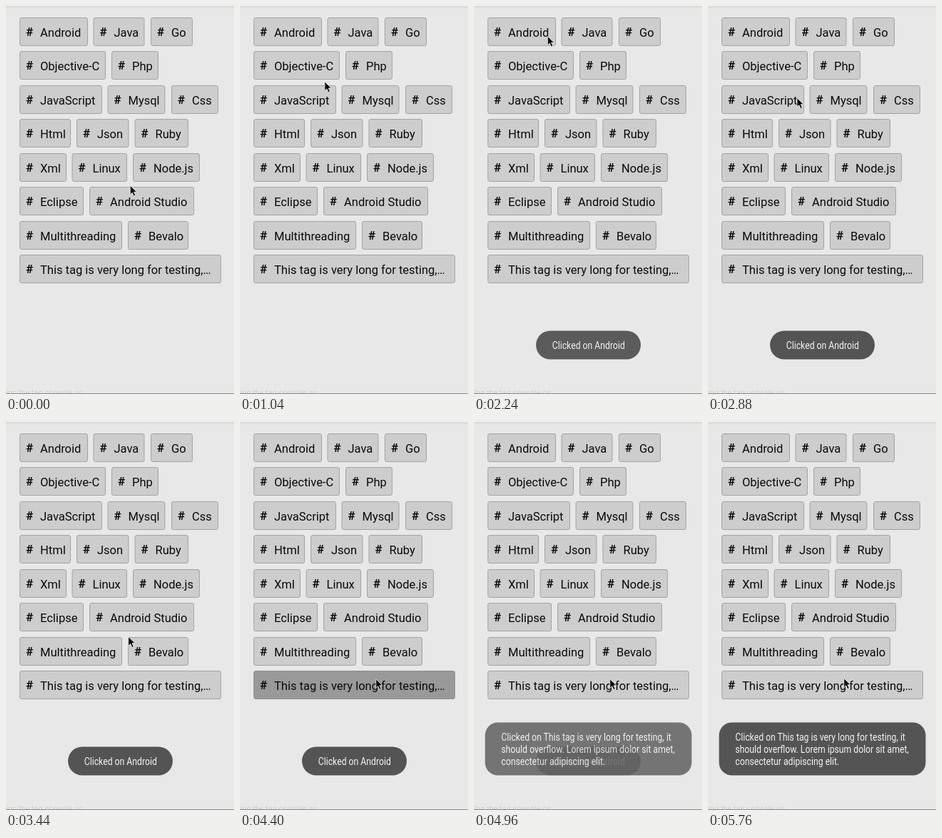
An HTML page that plays this animation: 320x543 px, repeating every 6.48 s.

```html
<!DOCTYPE html>
<html lang="en">
<head>
<meta charset="utf-8">
<title>Tag list</title>
<style>
  html, body { margin: 0; width: 100%; height: 100%; overflow: hidden; background: #e8e8e8; }
  svg { display: block; width: 100%; height: 100%; }
  text { font-family: Roboto, "Open Sans", sans-serif; white-space: pre; }
  .chip rect { fill: #cdcdcd; stroke: #a3a3a3; }
  .chip.down rect { fill: #999; stroke: #8e8e8e; }
  .chip text { font-size: 16.5px; fill: #0a0a0a; }
  .chip .hash { font-size: 17px; font-weight: 700; }
  .toast rect { fill: #545454; }
  .toast text { font-size: 13.9px; fill: #f4f4f4; }
  .caption { font-size: 11px; fill: #cfcfcf; }
</style>
</head>
<body>
<svg id="stage" viewBox="0 0 320 543">
  <defs>
    <linearGradient id="shade" x2="0" y2="1">
      <stop offset="0" stop-color="#d6d6d6"/>
      <stop offset="1" stop-color="#e8e8e8"/>
    </linearGradient>
  </defs>
  <rect width="320" height="543" fill="#e8e8e8"/>
  <rect width="320" height="4" fill="url(#shade)"/>
  <text class="caption" x="0" y="545">ing the tag console on</text>
  <rect y="542" width="320" height="1" fill="#8a8a8a"/>
</svg>
<script>
const LOOP = 6480, STEP = 80;
const stage = document.getElementById('stage');

function add(parent, tag, attrs, text) {
  const node = document.createElementNS('http://www.w3.org/2000/svg', tag);
  for (const key in attrs) node.setAttribute(key, attrs[key]);
  if (text) node.textContent = text;
  return parent.appendChild(node);
}

// Each row: label, left, right
const rows = [
  [['Android', 19, 115], ['Java', 122.5, 194.5], ['Go', 203, 262]],
  [['Objective-C', 19, 140], ['Php', 148, 214]],
  [['JavaScript', 19, 135], ['Mysql', 142.5, 223.5], ['Css', 232, 298]],
  [['Html', 19, 91], ['Json', 99, 172.5], ['Ruby', 180.5, 256]],
  [['Xml', 19, 85], ['Linux', 92.5, 170], ['Node.js', 178, 272]],
  [['Eclipse', 19, 109], ['Android Studio', 117, 264]],
  [['Multithreading', 19, 163], ['Bevalo', 171, 256]],
  [['This tag is very long for testing,…', 19, 302]]
];

function addChip(label, left, right, top) {
  const chip = add(stage, 'g', { class: 'chip' });
  add(chip, 'rect', { x: left + 0.5, y: top + 0.5, width: right - left - 1, height: 39, rx: 2.5 });
  add(chip, 'text', { class: 'hash', x: left + 9, y: top + 26 }, '#');
  add(chip, 'text', { x: left + 29, y: top + 26.5 }, label);
  return chip;
}

const chips = rows.map((row, i) =>
  row.map(([label, left, right]) => addChip(label, left, right, Math.floor(16 + i * 47.5))));

function addToast(x, y, w, h, r, textX, baseline, lines) {
  const toast = add(stage, 'g', { class: 'toast' });
  add(toast, 'rect', { x, y, width: w, height: h, rx: r });
  // Condensed face
  const block = add(toast, 'g', { transform: `translate(${textX} ${baseline}) scale(.88 1)` });
  lines.forEach((line, i) => add(block, 'text', { y: i * 17 }, line));
  return toast;
}

const shortToast = addToast(87, 454.5, 147, 40, 20, 109.8, 479.8, ['Clicked on Android']);
const longToast = addToast(15.5, 420.5, 290, 74, 18, 38.3, 445.8, [
  'Clicked on This tag is very long for testing, it',
  'should overflow. Lorem ipsum dolor sit amet,',
  'consectetur adipiscing elit.'
]);

const cursor = add(stage, 'path', {
  d: 'M.8 .8V13.4L3.7 10.7L5.9 15.6L8.2 14.6L6 9.8H10Z',
  fill: '#050505', stroke: '#f2f2f2', 'stroke-width': 0.8
});

const linear = p => p;
const speedUp = k => p => p ** k;
const slowDown = k => p => 1 - (1 - p) ** k;
const jump = p => p < 1 ? 0 : 1;

// Time, x, y, easing from the previous point
const path = [
  [0, 173.5, 250.5],
  [80, 174, 251.5, jump],
  [400, 174, 251.5, linear],
  [1120, 110, 84, speedUp(1.15)],
  [1440, 102.5, 41.5, slowDown(1.4)],
  [2480, 102.5, 41.5, linear],
  [3200, 149, 227, speedUp(1.3)],
  [3760, 189.5, 361, slowDown(1.4)],
  [3840, 189.5, 361, linear],
  [4000, 190, 359, linear],
  [5680, 190, 359, linear],
  [5760, 190, 358, jump],
  [LOOP, 190, 358, linear]
];

function cursorAt(t) {
  const i = path.findIndex((point, n) => n > 0 && t <= point[0]);
  const [t0, x0, y0] = path[i - 1];
  const [t1, x1, y1, ease] = path[i];
  const p = ease((t - t0) / (t1 - t0));
  return [x0 + (x1 - x0) * p, y0 + (y1 - y0) * p];
}

const fadeIn = [0.06, 0.3, 0.57, 0.78, 0.95, 1];
const fadeOut = [0.97, 0.88, 0.72, 0.5, 0.22, 0];

function fade(levels, start, t) {
  const i = Math.round((t - start) / STEP);
  return levels[Math.min(i, levels.length - 1)];
}

function draw() {
  const t = Math.floor(performance.now() % LOOP / STEP) * STEP;
  const [x, y] = cursorAt(t);
  cursor.setAttribute('transform', `translate(${x.toFixed(2)} ${y.toFixed(2)})`);
  chips[0][0].classList.toggle('down', t >= 1680 && t < 1920);
  chips[7][0].classList.toggle('down', t >= 4400 && t < 4720);
  shortToast.style.opacity = t < 1920 ? 0 : t < 4720 ? fade(fadeIn, 1920, t) : fade(fadeOut, 4720, t);
  longToast.style.opacity = t < 4720 ? 0 : fade(fadeIn, 4720, t);
  requestAnimationFrame(draw);
}
draw();
</script>
</body>
</html>
```
